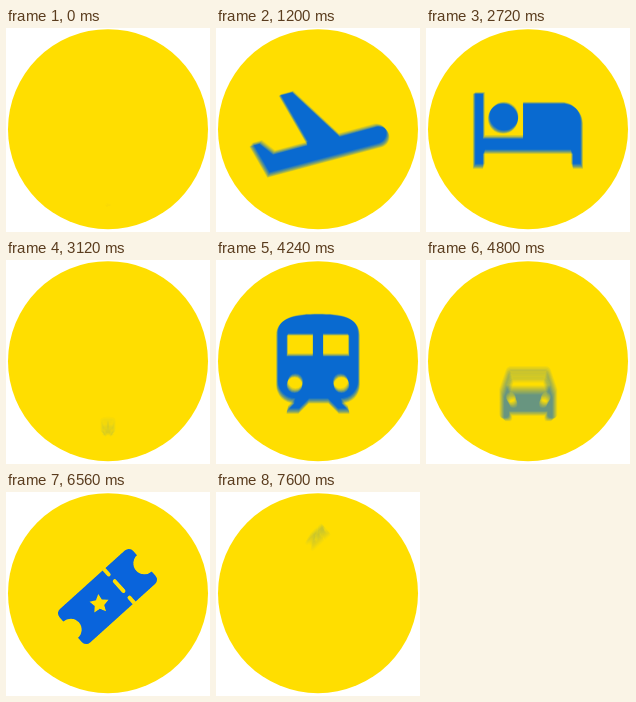
These frames come from a looping animation (204x204 px, 7.68 s). An HTML page with a canvas:

```html
<!DOCTYPE html>
<html lang="en">
<head>
<meta charset="utf-8">
<title>Travel icons</title>
<style>
  html, body { margin: 0; width: 100%; height: 100%; overflow: hidden; background: #fff; }
  canvas { display: block; width: 204px; height: 204px; }
</style>
</head>
<body>
<canvas id="stage" width="204" height="204"></canvas>
<script>
const SIZE = 204, LOOP = 7680, STEP = 80, SLOT = 1520;
const YELLOW = '#ffde00', BLUE = '#0564d8';
const PIVOT = { x: 102, y: 105 };
const SHUTTER = 40, SAMPLES = 10;

const stage = document.getElementById('stage').getContext('2d');
const layerCanvas = document.createElement('canvas');
layerCanvas.width = layerCanvas.height = SIZE;
const layer = layerCanvas.getContext('2d');

function starPath(cx, cy, outer, inner) {
  const points = Array.from({ length: 10 }, (_, i) => {
    const angle = Math.PI / 2 + i * Math.PI / 5, r = i % 2 ? inner : outer;
    return (cx + r * Math.cos(angle)).toFixed(2) + ' ' + (cy + r * Math.sin(angle)).toFixed(2);
  });
  return 'M' + points.join('L') + 'z';
}

const dot = (x, y, r) => `M${x - r} ${y}a${r} ${r} 0 1 0 ${2 * r} 0a${r} ${r} 0 1 0 ${-2 * r} 0z`;

const plane = 'M22.07 9.64c-.21-.8-1.04-1.28-1.84-1.06L14.92 10l-6.9-6.43-1.93.51 4.14 7.17' +
  '-4.97 1.33-1.97-1.54-1.45.39 2.59 4.49L21 11.49c.81-.23 1.28-1.05 1.07-1.85z';
const bed = dot(7, 10, 3) + 'M19 7h-8v7H3V5H1v15h2v-3h18v3h2v-9c0-2.21-1.79-4-4-4z';
const train = 'M12 2c-4 0-8 .5-8 4v9.5C4 17.43 5.57 19 7.5 19L6 20.5v.5h2.23l2-2H14l2 2h2v-.5' +
  'L16.5 19c1.93 0 3.5-1.57 3.5-3.5V6c0-3.5-3.58-4-8-4zM6 6h5v4H6zM13 6h5v4h-5z' +
  dot(7.5, 15.5, 1.5) + dot(16.5, 15.5, 1.5);
const car = 'M18.92 6.01C18.72 5.42 18.16 5 17.5 5h-11c-.66 0-1.21.42-1.42 1.01L3 12v8' +
  'c0 .55.45 1 1 1h1c.55 0 1-.45 1-1v-1h12v1c0 .55.45 1 1 1h1c.55 0 1-.45 1-1v-8z' +
  'M5 11l1.5-4.5h11L19 11z' + dot(6.5, 14.5, 1.5) + dot(17.5, 14.5, 1.5);
const ticket = 'M-43.6-22.6h87.2a6 6 0 0 1 6 6v5.6a11 11 0 0 0 0 22v5.6a6 6 0 0 1-6 6h-87.2' +
  'a6 6 0 0 1-6-6V11a11 11 0 0 0 0-22v-5.6a6 6 0 0 1 6-6z' +
  'M13.6-22.6h4v7a2 2 0 0 1-4 0zM13.6 22.6h4v-7a2 2 0 0 0-4 0z' +
  'M13.6-6.5a2 2 0 0 1 4 0v13a2 2 0 0 1-4 0z' + starPath(-11, 0, 10, 5);

const icon = (path, x, y, unit, angle = 0, exitDelay = 0) =>
  ({ shape: new Path2D(path), x, y, unit, angle: angle * Math.PI / 180, exitDelay });

const icons = [
  icon(plane, 19.6, 40, 7),
  icon(bed, 41.1, 41, 5.07),
  icon(train, 38.4, 44.4, 5.3),
  icon(car, 42.7, 41.6, 4.98),
  icon(ticket, 101.5, 104.5, 1, -42, 60),
];

function ease(time, start, duration) {
  const t = Math.min(1, Math.max(0, (time - start) / duration));
  return (1 - Math.cos(Math.PI * t)) / 2;
}

// Rises from below while growing, then leaves upwards while shrinking.
function pose(phase, exitDelay) {
  const shown = ease(phase, -43, 506);
  const gone = ease(phase, 1150 + exitDelay, 440);
  return { scale: shown * (1 - gone), dy: 74 * (1 - shown) - 78 * gone };
}

function drawIcon(item, phase) {
  for (let i = 0; i < SAMPLES; i++) {
    const offset = ((i + 0.5) / SAMPLES - 0.5) * SHUTTER;
    const { scale, dy } = pose(phase + offset, item.exitDelay);
    if (scale < 0.01) continue;
    layer.save();
    layer.globalAlpha = scale / SAMPLES;
    layer.translate(PIVOT.x, PIVOT.y + dy);
    layer.scale(scale, scale);
    layer.translate(item.x - PIVOT.x, item.y - PIVOT.y);
    layer.rotate(item.angle);
    layer.scale(item.unit, item.unit);
    layer.fill(item.shape, 'evenodd');
    layer.restore();
  }
}

function isStill(item, phase) {
  return phase - SHUTTER / 2 >= 463 && phase + SHUTTER / 2 <= 1150 + item.exitDelay;
}

function drawStill(item) {
  layer.save();
  layer.translate(item.x, item.y);
  layer.rotate(item.angle);
  layer.scale(item.unit, item.unit);
  layer.fill(item.shape, 'evenodd');
  layer.restore();
}

function render(time) {
  layer.clearRect(0, 0, SIZE, SIZE);
  layer.globalCompositeOperation = 'lighter';
  layer.fillStyle = BLUE;
  icons.forEach((item, i) => {
    let phase = time - i * SLOT;
    if (phase > LOOP - 100) phase -= LOOP;
    if (isStill(item, phase)) drawStill(item);
    else drawIcon(item, phase);
  });

  stage.fillStyle = '#fff';
  stage.fillRect(0, 0, SIZE, SIZE);
  stage.fillStyle = YELLOW;
  stage.beginPath();
  stage.arc(102, 101.2, 100, 0, 2 * Math.PI);
  stage.fill();
  stage.drawImage(layerCanvas, 0, 0);
}

const startTime = performance.now();
function tick() {
  const elapsed = (performance.now() - startTime) % LOOP;
  render(Math.floor(elapsed / STEP) * STEP);
  requestAnimationFrame(tick);
}
tick();
</script>
</body>
</html>
```
